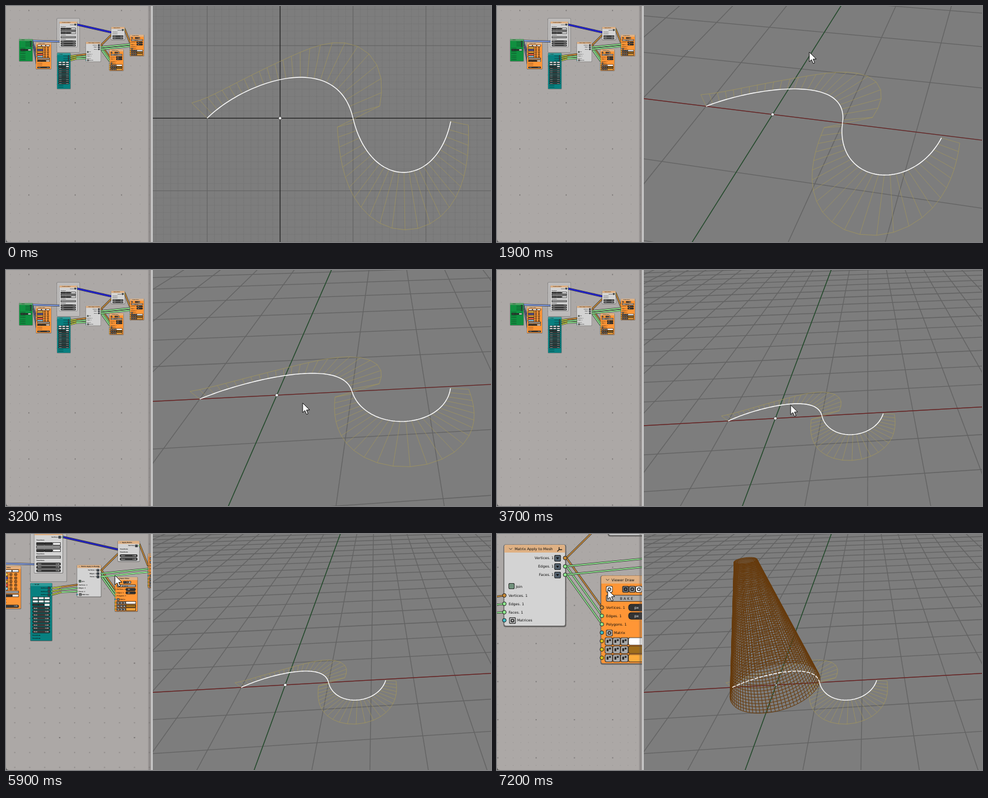
Animation of 806 by 394 pixels, one loop 8000 ms. Source, as an HTML page with a canvas:

```html
<!DOCTYPE html>
<html lang="en">
<head>
<meta charset="utf-8">
<title>Curvature comb and node tree</title>
<style>
html, body { margin: 0; width: 100%; height: 100%; overflow: hidden; background: #7d7d7d; }
canvas { display: block; }
</style>
</head>
<body>
<canvas id="stage" width="806" height="394"></canvas>
<script>
const ctx = document.getElementById('stage').getContext('2d');
const LOOP = 8000, STEP = 100, SPLIT = 244;

const mix = (a, b, f) => a + (b - a) * f;
const mixAll = (a, b, f) => a.map((v, i) => mix(v, b[i], f));
const ramp = (t, from, to) => Math.min(1, Math.max(0, (t - from) / (to - from)));

function rect(x, y, w, h, color, r = 0) {
  ctx.fillStyle = color;
  ctx.beginPath();
  ctx.roundRect(x, y, w, h, r);
  ctx.fill();
}
function path(points, color, width = 1) {
  ctx.strokeStyle = color;
  ctx.lineWidth = width;
  ctx.beginPath();
  points.forEach(p => ctx.lineTo(p[0], p[1]));
  ctx.stroke();
}
function dot(x, y, r, color, edge = '#222', width = 1) {
  ctx.beginPath();
  ctx.arc(x, y, r, 0, 7);
  ctx.fillStyle = color;
  ctx.fill();
  ctx.strokeStyle = edge;
  ctx.lineWidth = width;
  ctx.stroke();
}

// ---- 3D view ----

// Each pose: screen origin, X axis, Y axis, perspective along X and Y
const poses = [
  [455.5, 187.3, 121.2, 0, 0, -121.2, 0, 0],
  [445, 172, 125.5, 22, 27, -126, 0, .015],
  [458, 181, 113.3, 14, 53.3, -85, -.025, .12],
  [450, 209, 126.5, -6.4, 29.2, -67.2, .012, .16],
  [464, 252, 72.5, -4.1, 14.9, -41, .007, .1]
];

// Spin, tilt, orbit low, then zoom out, with short rests between
function viewAt(t) {
  const turn = ramp(t, 1100, 1400) + ramp(t, 1400, 1900)
    + mix(.15 * ramp(t, 1900, 2300), 1, ramp(t, 2500, 3200))
    + .9 * ramp(t, 3200, 3700) + .1 * ramp(t, 3900, 4000);
  const i = Math.min(poses.length - 2, Math.floor(turn));
  return mixAll(poses[i], poses[i + 1], turn - i);
}

const beziers = [
  [[-1, 0], [-.5, .5], [.78, .967], [1, 0]],
  [[1, 0], [1.233, -.988], [2.141, -.988], [2.34, -.045]]
];

function curveAt(u) {
  const i = Math.min(1, Math.floor(u)), t = u - i, s = 1 - t;
  const p = [], v = [], a = [];
  for (let k = 0; k < 2; k++) {
    const [A, B, C, D] = beziers[i].map(q => q[k]);
    p[k] = s * s * s * A + 3 * s * s * t * B + 3 * s * t * t * C + t * t * t * D;
    v[k] = 3 * (s * s * (B - A) + 2 * s * t * (C - B) + t * t * (D - C));
    a[k] = 6 * (s * (C - 2 * B + A) + t * (D - 2 * C + B));
  }
  return { p, v, a };
}

function sample(n, from, to) {
  return Array.from({ length: n + 1 }, (_, i) => curveAt(mix(from, to, i / n)));
}

// Comb teeth point away from the bend, as long as the curvature is strong
const comb = sample(49, 0, 2).map(({ p, v, a }) => {
  const k = .388 * (v[0] * a[1] - v[1] * a[0]) / Math.hypot(...v) ** 4;
  return [p, [p[0] + v[1] * k, p[1] - v[0] * k]];
});

function drawGrid(p, q, flat, project) {
  const line = (a, b, color, width) => {
    // Cut the line where it passes behind the eye
    const da = .95 + p * a[0] + q * a[1], db = .95 + p * b[0] + q * b[1];
    if (da <= 0 && db <= 0) return;
    const cut = mixAll(a, b, da / (da - db));
    path([da > 0 ? a : cut, db > 0 ? b : cut].map(project), color, width);
  };
  const along = (n, color, width) => line([-40, n], [40, n], color, width);
  const across = (n, color, width) => line([n, -40], [n, 40], color, width);
  if (flat) {
    ctx.setLineDash([1, 1]);
    for (let n = -20; n <= 30; n++) {
      along(n / 10, '#707070', .8);
      across(n / 10, '#707070', .8);
    }
    ctx.setLineDash([]);
  }
  for (let n = -40; n <= 40; n++) {
    along(n, '#636363', flat ? 1 : 1.3);
    across(n, '#636363', flat ? 1 : 1.3);
  }
  along(0, flat ? '#222' : '#691c1c', 1.2);
  across(0, flat ? '#222' : '#204a29', 1.3);
}

// Wire cone between two ellipses: centre, then the two half axes
const coneTop = [413, 44.5, 19, -2, -1, 5], coneBase = [462, 257, 74.5, -12, -6, 40.5];

function drawCone() {
  const RINGS = 56, SPOKES = 72, color = '#663a0c';
  const point = (f, i) => {
    const [x, y, ax, ay, bx, by] = mixAll(coneTop, coneBase, f);
    const angle = i / SPOKES * 2 * Math.PI, c = Math.cos(angle), s = Math.sin(angle);
    return [x + ax * c + bx * s, y + ay * c + by * s];
  };
  const spokes = [...Array(SPOKES + 1).keys()];
  for (let r = 0; r <= RINGS; r++) path(spokes.map(i => point((r / RINGS) ** 1.2, i)), color);
  spokes.forEach(i => path([point(0, i), point(1, i)], color));
}

function drawViewport(t) {
  const [ox, oy, ux, uy, vx, vy, p, q] = viewAt(t);
  const flat = t < 1200, cone = t >= 7100, olive = 'rgba(166,153,88,.75)';
  const project = ([x, y]) => {
    const d = 1 + p * x + q * y;
    return [ox + (x * ux + y * vx) / d, oy + (x * uy + y * vy) / d];
  };
  const half = i => sample(60, i, i + 1).map(c => project(c.p));
  ctx.save();
  ctx.beginPath();
  ctx.rect(SPLIT, 0, 806 - SPLIT, 394);
  ctx.clip();
  rect(SPLIT, 0, 562, 394, '#7d7d7d');
  drawGrid(p, q, flat, project);
  comb.forEach(tooth => path(tooth.map(project), olive, .8));
  path(comb.map(tooth => project(tooth[1])), olive, .9);
  if (cone) {
    drawCone();
    ctx.setLineDash([6, 2]);
  }
  path(half(0), '#fff', 1.4);
  ctx.setLineDash([]);
  path(half(1), '#fff', 1.4);
  dot(ox, oy, cone ? 1.5 : 2.5, '#fff', '#333', .8);
  ctx.restore();
}

// ---- Node editor ----

const TAN = '#dfb184', ORANGE = '#ff9636', GREEN = '#8ee88e', AMBER = '#c98a36',
  CYAN = '#3bb8c4', YELLOW = '#d8c21c', GREY = '#d3d3d3';
const DETAIL = 4.13, ROW = 14;
let zoom = 1;

// Outlines and lettering stay strong on screen when the editor is zoomed out
function widget(x, y, w, h, color, r = 2) {
  const edge = Math.min(h * .2, Math.max(.8, .7 * DETAIL / zoom));
  rect(x, y, w, h, '#1c1c1c', r);
  rect(x + edge, y + edge, w - 2 * edge, h - 2 * edge, color, r);
}
function text(s, x, y, color = '#111', align = 'left') {
  ctx.font = (zoom < DETAIL / 2 ? 'bold ' : '') + '6px "DejaVu Sans", sans-serif';
  ctx.fillStyle = color;
  ctx.textAlign = align;
  ctx.fillText(s, x, y);
}
function socket(x, y, color) {
  dot(x, y, 3.1, color);
}
function menu(x, y) {
  widget(x, y, 11, 11, '#53606c');
  ctx.fillStyle = '#111';
  ctx.beginPath();
  ctx.moveTo(x + 3, y + 4);
  ctx.lineTo(x + 8, y + 4);
  ctx.lineTo(x + 5.5, y + 7.5);
  ctx.fill();
}
function icon(x, y, color = '#aaa') {
  widget(x, y, 11, 11, color);
  dot(x + 5.5, y + 5.5, 2.3, color, '#111', 1.2);
}

// Runs a drawing at an editor position, in pixels of the closest zoom
function place(x, y, draw) {
  ctx.save();
  ctx.translate(x, y);
  ctx.scale(1 / DETAIL, 1 / DETAIL);
  draw();
  ctx.restore();
}

function box(w, h, color, title, head = TAN) {
  rect(-1.5, -.5, w + 3.5, h + 3, 'rgba(0,0,0,.4)', 4);
  rect(0, 0, w, h, color, 3);
  rect(0, 0, w, 13, head, [3, 3, 0, 0]);
  path([[8, 5.5], [10.5, 8], [13, 5.5]], '#333', .9);
  text(title, 17, 9);
}

function matrixNode() {
  box(101, 135, GREY, 'Matrix Apply to Mesh');
  path([[88, 11], [91, 8], [91, 4], [91, 8], [96, 8]], '#111', 1.2);
  ['Vertices. 1', 'Edges. 1', 'Faces. 1'].forEach((label, i) => {
    const color = i ? GREEN : AMBER, y = 22 + ROW * i;
    text(label, 82, y + 2, '#111', 'right');
    menu(83, y - 5);
    socket(101, y, color);
    text(label, 7, y + 64.5);
    socket(0, y + 62.5, color);
  });
  widget(7, 64, 10, 10, '#71917c');
  text('Join', 19, 72);
  icon(8, 121);
  text('Matrices', 21, 128);
  socket(0, 126, CYAN);
}

function viewerNode(on) {
  box(95, 146, ORANGE, 'Viewer Draw');
  icon(8, 17, on ? '#fff' : '#999');
  ['#66686c', '#8a8a8a', '#fff'].forEach((c, i) => icon(35 + 11 * i, 17, c));
  widget(8, 32, 80, 11, '#aaa');
  text('B A K E', 31, 40);
  ['Vertices. 1', 'Edges. 1', 'Polygons. 1'].forEach((label, i) => {
    const y = 53 + ROW * i;
    text(label, 8, y + 2);
    socket(1, y, i ? GREEN : AMBER);
    if (i > 1) return;
    widget(45, y - 6, 43, 12, '#333', 5);
    text('px', 55, y + 2, '#fff');
  });
  icon(8, 90);
  text('Matrix', 21, 97);
  socket(1, 95, CYAN);
  ['#fff', '#a16e1c', '#fbab3c'].forEach((c, i) => {
    const y = 104 + ROW * i;
    socket(1, y + 5, YELLOW);
    for (let x = 6; x < 40; x += 13) {
      widget(x, y - 1, 13, 13, '#aaa');
      rect(x + 3, y + 3, 3, 5, '#222');
      rect(x + 7, y + 2, 3, 3, '#222');
    }
    widget(45, y - 1, 44, 13, c);
  });
}

// One letter per row: o output, t text, w white buttons, b dark buttons, g grey button, s slider, c swatch
const rowKinds = {
  o(w, y) {
    text('Vertices', w - 20, y + 8, '#111', 'right');
    menu(w - 18, y + 1);
    socket(w, y + 6, GREEN);
  },
  t(w, y) { text('Transform', 8, y + 8); },
  g(w, y) { widget(8, y, w - 16, 12, '#9a9a9a'); },
  s(w, y) {
    widget(8, y, w - 16, 12, '#3c3c3c', 5);
    text('Num', 14, y + 8, '#ddd');
    text('1.00', w - 14, y + 8, '#fff', 'right');
  },
  w(w, y) { buttons(w, y, ['#eee', '#eee', '#eee']); },
  b(w, y) { buttons(w, y, ['#333', '#333', '#eee']); },
  c(w, y, i) {
    widget(6, y, w * .42, 13, ['#8fd0f0', '#ffcf4a', '#5a5aa8', '#ffb63a', '#ff5a48'][i % 5]);
    icon(w * .54, y + 1, ORANGE);
    icon(w * .74, y + 1, ORANGE);
  }
};
function buttons(w, y, colors) {
  const third = (w - 16) / 3;
  colors.forEach((c, j) => widget(8 + j * third, y, third, 12, c));
}
function plainNode(w, h, color, title, rows, head) {
  box(w, h, color, title, head);
  [...rows].forEach((kind, i) => rowKinds[kind](w, 15 + i * (h - 16) / rows.length, i));
}

// Width in screen pixels at any zoom
function link(points, color, width = 1.8) {
  path(points, '#333', (width + 1.4) / zoom);
  path(points, color, width / zoom);
}

function drawDots(tx, ty) {
  for (let step = 77; step * zoom > 11; step /= 5) {
    const gap = step * zoom, size = gap > 20 ? 2 : 1.3;
    ctx.fillStyle = `rgba(80,78,78,${Math.min(.4, gap / 90)})`;
    const start = v => ((v % gap) + gap) % gap - gap;
    for (let x = start(38 * zoom + tx); x < 240; x += gap)
      for (let y = start(7.5 * zoom + ty); y < 394; y += gap)
        ctx.fillRect(x - size / 2, y - size / 2, size, size);
  }
}

function drawLinks() {
  link([[44, 58], [90, 59.3]], '#7d9be8');
  link([[44, 58], [51, 97]], '#6672b0', 1);
  link([[44, 60], [51, 78]], '#6672b0', 1);
  link([[118, 31], [175, 44]], '#2222cc', 2.4);
  link([[158, 65.3], [175, 48.4]], AMBER);
  link([[197, 38], [206, 60.9]], AMBER);
  for (let i = 0; i < 3; i++) {
    const drop = ROW / DETAIL * i, out = [158, 65.3 + drop], color = i ? GREEN : AMBER;
    const bend = [117, 82.6 + drop * .8];
    link([[107, 84 + drop], bend], '#b9c63c');
    link([bend, [133, 80.5 + drop]], color);
    link([out, [172.3, 85.3 + drop]], color);
    if (i) link([out, [206, 60.5 + drop]], GREEN);
  }
}

function drawEditor(t) {
  const r = ramp(t, 5100, 6800);
  zoom = DETAIL ** (r ** 1.44);
  const tx = 171.6 * (1 - zoom) + 9 * Math.sin(Math.PI * r), ty = 73.4 * (1 - zoom);
  ctx.save();
  ctx.beginPath();
  ctx.rect(0, 0, 241, 394);
  ctx.clip();
  rect(0, 0, 241, 394, '#aca8a6');
  drawDots(tx, ty);
  ctx.translate(tx, ty);
  ctx.scale(zoom, zoom);
  rect(84.5, 20.5, 38, 57, '#777', .8);
  rect(85, 21, 37, 56, '#bdbbba', .8);
  drawLinks();
  place(22, 55, () => plainNode(91, 153, '#109040', 'Plane', 'oootbttttt', '#5aa06a'));
  place(50, 61, () => plainNode(103, 182, ORANGE, 'Viewer Index', 'wcccccgbtts'));
  place(89, 26, () => plainNode(120, 174, GREY, 'Transform Matrix', 'otbgbtgtsss'));
  place(85, 78.7, () => plainNode(91, 246, '#078080', 'Script', 'ooowwbsssssssstt', '#2d9a98'));
  place(175, 35, () => plainNode(91, 87, GREY, 'Apply Matrix', 'ottss'));
  place(206, 48, () => viewerNode(true));
  place(133, 60, matrixNode);
  place(172, 72.5, () => viewerNode(t >= 7000));
  ctx.restore();

  rect(236, 0, 5, 394, 'rgba(90,88,88,.22)');
  rect(238, 0, 1, 394, 'rgba(70,70,70,.25)');
  rect(241, 0, 3, 394, '#c6c6c6');
  ctx.fillStyle = '#555';
  ctx.beginPath();
  ctx.moveTo(0, 389);
  ctx.quadraticCurveTo(0, 394, 5, 394);
  ctx.lineTo(0, 394);
  ctx.fill();
}

// ---- Pointer ----

// Key points: time, x, y
const pointer = [
  [200, 753, 77], [1100, 533, 202], [1400, 496, 178], [1900, 519, 77], [2500, 521, 70],
  [3200, 493, 222], [4100, 484, 228], [4600, 391, 174], [5000, 165, 71], [5900, 181, 69],
  [6900, 181, 72], [7000, 184, 93]
];

function drawPointer(t) {
  if (t < pointer[0][0]) return;
  const next = pointer.findIndex(k => k[0] > t);
  const b = pointer.at(next), a = next < 0 ? b : pointer[next - 1];
  const [, x, y] = a === b ? b : mixAll(a, b, ramp(t, a[0], b[0]));
  ctx.save();
  ctx.translate(x, y);
  ctx.beginPath();
  [[0, 0], [0, 16], [3.7, 12.6], [6.5, 19], [9, 18], [6.3, 11.8], [11.6, 11.6]]
    .forEach(p => ctx.lineTo(...p));
  ctx.closePath();
  ctx.fillStyle = '#fff';
  ctx.fill();
  ctx.strokeStyle = '#111';
  ctx.lineWidth = 1;
  ctx.stroke();
  ctx.restore();
}

const begin = performance.now();
function frame() {
  const t = Math.floor((performance.now() - begin) % LOOP / STEP) * STEP;
  drawViewport(t);
  drawEditor(t);
  drawPointer(t);
  requestAnimationFrame(frame);
}
frame();
</script>
</body>
</html>
```
